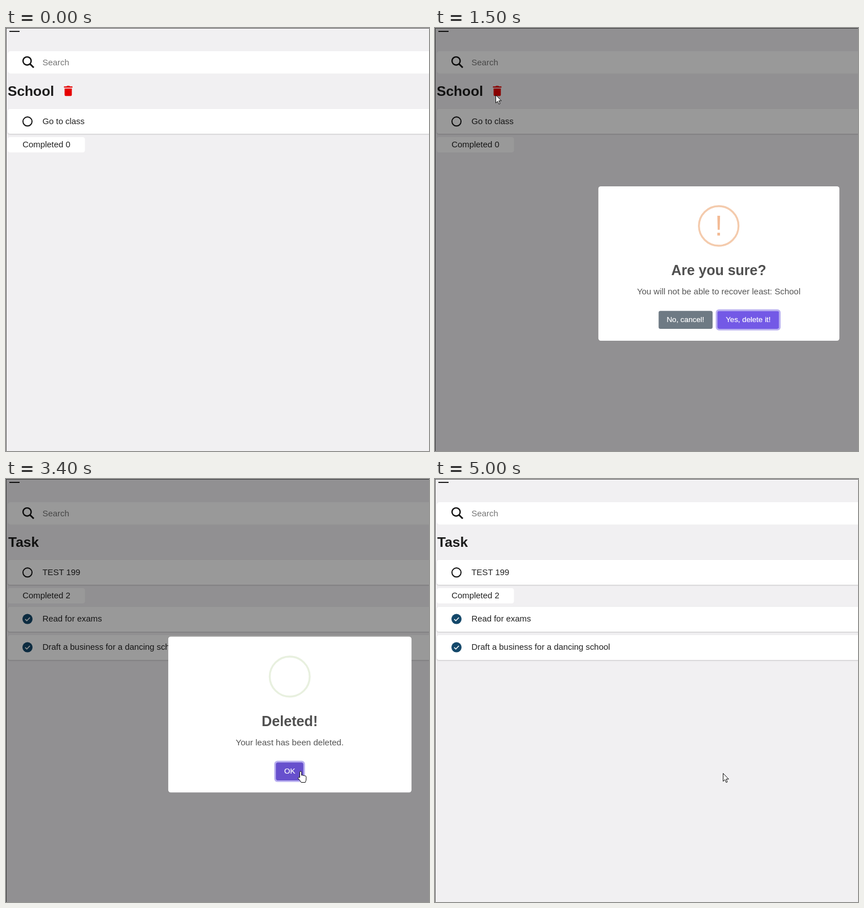
These frames come from a looping animation (748 px wide and 748 px high, 5.1 s). An HTML page:

```html
<!DOCTYPE html>
<html lang="en">
<head>
<meta charset="utf-8">
<title>Delete a list</title>
<style>
  html, body { margin: 0; width: 100%; height: 100%; overflow: hidden; background: #f1f0f2; }
  svg { display: block; width: 100vw; height: 100vh; font: 14.9px "Liberation Sans", Arial, sans-serif; }
  text { fill: #222; white-space: pre; }
  .h { font-size: 24.6px; font-weight: bold; fill: #1c1c1c; }
  .row { fill: #fff; filter: drop-shadow(0 1px 1.2px rgba(0, 0, 0, .18)); }
  .modal text { text-anchor: middle; fill: #555; }
  .modal .title { font-size: 26.25px; font-weight: bold; fill: #505050; }
  .modal .body { font-size: 15.75px; }
  .modal .label { font-size: 14px; fill: #fff; stroke: #fff; stroke-width: .2px; }
  .ring { fill: none; stroke-width: 3.5; }
  .focus { fill: none; stroke: #b9b0f0; stroke-width: 3; }
  .cursor { fill: #fff; stroke: #111; stroke-width: 1; stroke-linejoin: round; }
</style>
</head>
<body>
<svg viewBox="0 0 748 748">
  <defs>
    <g id="done">
      <circle r="9" fill="#14486a"/>
      <path d="M-4 .3-1.2 3.1 4.2-2.7" fill="none" stroke="#fff" stroke-width="1.5"/>
    </g>
    <circle id="todo" r="8" fill="none" stroke="#111" stroke-width="1.9"/>
  </defs>

  <rect width="748" height="748" fill="#f1f0f2"/>
  <path d="M0 .5H748M.5 0V748" stroke="#606060"/>
  <path d="M6 6H24" stroke="#222" stroke-width="2"/>
  <rect x="3" y="41" width="760" height="39.5" rx="5" fill="#fff"/>
  <g fill="none" stroke="#111" stroke-width="2.4">
    <circle cx="37.3" cy="58.3" r="7.2"/>
    <path d="M42.4 63.4 49 70" stroke-width="2.8"/>
  </g>
  <text x="64.5" y="65.7" style="fill:#757575">Search</text>
  <rect class="row" x="3" y="143" width="760" height="44" rx="4"/>
  <use href="#todo" x="38" y="165.3"/>
  <rect x="3" y="193" width="136.5" height="27" rx="4" fill="#fff"/>

  <g id="school">
    <text class="h" x="3" y="119.8">School</text>
    <path fill="#e60000" d="M102.5 103.2H107L108 102.2H112L113 103.2H117.5V105.4H102.5ZM103.6 107H116.4V118.2Q116.4 120.2 114.4 120.2H105.6Q103.6 120.2 103.6 118.2Z"/>
    <text x="64.5" y="170">Go to class</text>
    <text x="29.3" y="211">Completed 0</text>
  </g>
  <g id="task">
    <text class="h" x="4" y="119.8">Task</text>
    <text x="64.5" y="170">TEST 199</text>
    <text x="29.3" y="211">Completed 2</text>
    <rect class="row" x="3" y="226" width="760" height="44" rx="4"/>
    <rect class="row" x="3" y="276" width="760" height="44" rx="4"/>
    <use href="#done" x="38" y="247.6"/>
    <use href="#done" x="38" y="297.6"/>
    <text x="64.5" y="252.3">Read for exams</text>
    <text x="64.5" y="302.3">Draft a business for a dancing school</text>
  </g>

  <rect id="shade" width="748" height="748"/>

  <g id="ask" class="modal">
    <rect x="278" y="273" width="448" height="287" rx="4.4" fill="#fff"/>
    <circle class="ring" cx="501.7" cy="346.6" r="36.8" stroke="#f4cbad"/>
    <text x="501.7" y="364" style="font-size:52.5px;fill:#f3ba94">!</text>
    <text class="title" x="501.7" y="437.6">Are you sure?</text>
    <text class="body" x="501.7" y="473.6">You will not be able to recover least: School</text>
    <rect x="390" y="504.5" width="100.3" height="33.5" rx="3.5" fill="#6e7a84"/>
    <text class="label" x="440" y="525.5">No, cancel!</text>
    <rect id="yes" x="499" y="504.5" width="115" height="33.5" rx="3.5"/>
    <rect class="focus" x="497.7" y="503.2" width="117.6" height="36.1" rx="4.5"/>
    <text class="label" x="556.5" y="525.5">Yes, delete it!</text>
  </g>

  <g id="gone" class="modal">
    <rect x="278" y="273" width="448" height="287" rx="4.4" fill="#fff"/>
    <circle class="ring" cx="501.7" cy="346.6" r="36.8" stroke="#e8f0df"/>
    <path id="sweep" class="ring" stroke="#a5dc86" pathLength="180" d="M527.72 372.62A36.8 36.8 0 0 0 475.68 320.58"/>
    <path id="tick" d="M482.3 347.5 495 360.2 522.3 333.4" pathLength="1" fill="none" stroke="#b5dc97" stroke-width="4.4" stroke-linecap="round"/>
    <text class="title" x="501.7" y="437.6">Deleted!</text>
    <text class="body" x="501.7" y="473.6">Your least has been deleted.</text>
    <g id="okBox">
      <rect id="ok" x="476" y="504.5" width="51" height="33.5" rx="3.5"/>
      <rect class="focus" x="474.7" y="503.2" width="53.6" height="36.1" rx="4.5"/>
      <text class="label" x="501.7" y="525.5">OK</text>
    </g>
  </g>

  <path id="arrow" class="cursor" d="M.5.5V14.6L3.7 11.6 5.9 16.6 8 15.7 5.9 10.7H10.3Z"/>
  <path id="hand" class="cursor" d="M-1.6 11V1.5a1.6 1.6 0 0 1 3.2 0V7q1.8-1 3 .4 1.6-.8 2.8.6 2-.4 2.4 1.4V14q0 2-1.6 5.5H1Q-1 16-4.4 12.6-5 10.8-3.2 10.6Z"/>
</svg>
<script>
const LOOP = 5100, STEP = 100;
const $ = id => document.getElementById(id);
const clamp = v => Math.min(1, Math.max(0, v));
const mix = (a, b, p) => a + (b - a) * p;
const show = (id, on) => $(id).style.display = on ? '' : 'none';

function bezier(x1, y1, x2, y2) {
  const at = (a, b, s) => 3 * a * s * (1 - s) ** 2 + 3 * b * s * s * (1 - s) + s ** 3;
  return x => {
    if (x <= 0 || x >= 1) return clamp(x);
    let lo = 0, hi = 1;
    for (let i = 0; i < 24; i++) {
      const s = (lo + hi) / 2;
      if (at(x1, x2, s) < x) lo = s; else hi = s;
    }
    return at(y1, y2, lo);
  };
}
const ease = bezier(.25, .1, .25, 1), easeIn = bezier(.42, 0, 1, 1);

// Value at time t along [time, value] keys, each span eased
function along(keys, t, fn = p => p) {
  let i = 1;
  while (i < keys.length - 1 && t > keys[i][0]) i++;
  const [t0, a] = keys[i - 1], [t1, b] = keys[i];
  return mix(a, b, fn(clamp((t - t0) / (t1 - t0))));
}

const popIn = [[0, .7], [135, 1.05], [240, .95], [300, 1]];
const modals = [
  { id: 'ask', shade: 1268, open: 1276, close: 2967 },
  { id: 'gone', shade: 3183, open: 3200, close: 4767 }
];
const pathX = [[600, 118], [900, 107], [1700, 107], [2200, 502], [2300, 512], [2500, 521],
  [4000, 521], [4200, 514], [4600, 514], [4800, 509]];
const pathY = [[600, 175], [900, 118], [1700, 118], [2200, 470], [2300, 484], [2500, 517],
  [4000, 517], [4200, 521], [4600, 521], [4800, 520]];

function drawModal({ id, shade, open, close }, t) {
  show(id, t >= open && t < close + 150);
  const out = ease(clamp((t - close) / 150));
  const size = along(popIn, t - open, ease) * (1 - out / 2);
  $(id).setAttribute('transform', `translate(501.8 416.6) scale(${size}) translate(-501.8 -416.6)`);
  $(id).setAttribute('opacity', 1 - out);
  return .4 * (ease((t - shade) / 100) - ease((t - close) / 100));
}

function drawTick(t) {
  const turn = 360 * easeIn((t - 212) / 298);
  const from = Math.max(0, turn - 180), to = Math.min(180, turn);
  show('sweep', turn > 0 && turn < 360);
  $('sweep').setAttribute('stroke-dasharray', `0 ${from} ${to - from} 400`);
  const p = clamp((t - 405) / 235);
  show('tick', p > 0);
  $('tick').setAttribute('stroke-dasharray', `${p} 2`);
}

function draw(t) {
  show('school', t < 3100);
  show('task', t >= 3100);
  $('shade').setAttribute('fill-opacity', modals.reduce((sum, m) => sum + drawModal(m, t), 0));
  drawTick(t - modals[1].open);

  const overYes = t >= 2500 && t < 3000, overOk = t >= 3300 && t < 4767;
  const onButton = over => over ? '#6750cd' : '#7359e6';
  $('yes').setAttribute('fill', onButton(overYes));
  $('ok').setAttribute('fill', onButton(overOk));
  $('okBox').setAttribute('opacity', t < 4767 ? 1 : .55);

  const hand = overYes || overOk || (t >= 900 && t < 1300);
  show('hand', hand);
  show('arrow', !hand && t >= 600);
  const place = `translate(${along(pathX, t)} ${along(pathY, t)})`;
  for (const id of ['hand', 'arrow']) $(id).setAttribute('transform', place);
}

const start = performance.now();
function tick(now) {
  const t = Math.max(0, now - start) % LOOP;
  draw(Math.floor(t / STEP) * STEP);
  requestAnimationFrame(tick);
}
draw(0);
requestAnimationFrame(tick);
</script>
</body>
</html>
```
